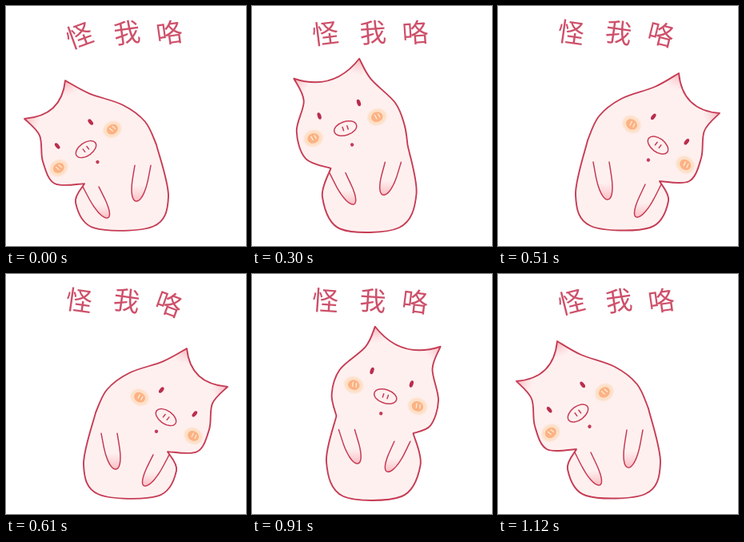
An HTML page for the animation above (1220 ms loop, 300x300 px).

```html
<!DOCTYPE html>
<html lang="zh">
<head>
<meta charset="utf-8">
<style>
  html, body { margin: 0; width: 100%; height: 100%; overflow: hidden; background: #fff; }
  svg { display: block; width: 100vw; height: 100vh; }
  text { font: 400 33px "Noto Sans CJK SC", "Noto Sans CJK", sans-serif; fill: #ce506a; text-anchor: middle; }
  .line { fill: none; stroke: #c63c54; stroke-width: 1.9; stroke-linecap: round; stroke-linejoin: round; }
  .thin { stroke-width: 1.5; }
</style>
</head>
<body>
<svg viewBox="0 0 300 300">
  <defs>
    <radialGradient id="blush">
      <stop offset="0" stop-color="#f6a5ae" stop-opacity=".8"/>
      <stop offset="1" stop-color="#fac4ca" stop-opacity="0"/>
    </radialGradient>
    <radialGradient id="halo">
      <stop offset=".75" stop-color="#fde0c8"/>
      <stop offset="1" stop-color="#fde6d8" stop-opacity="0"/>
    </radialGradient>
    <linearGradient id="paw" x1="0" y1="0" x2="0" y2="1">
      <stop offset=".55" stop-color="#fbc6ca" stop-opacity="0"/>
      <stop offset="1" stop-color="#fabcc2"/>
    </linearGradient>
    <clipPath id="inside"><path id="clip"/></clipPath>
    <ellipse id="eye" rx="2.3" ry="4.4" fill="#b92e4d"/>
    <g id="cheek">
      <ellipse rx="14" ry="12" fill="url(#halo)"/>
      <ellipse rx="7.4" ry="6.2" fill="#fcb283"/>
      <path d="M-2-3L-1 2M2.5-3L3.5 1.5" stroke="#fff0df" stroke-width="1.2" stroke-linecap="round"/>
    </g>
  </defs>
  <g id="words"></g>
  <g id="pig">
    <path id="skin" fill="#fff0f0"/>
    <g id="ears" clip-path="url(#inside)">
      <circle r="21" fill="url(#blush)"/><circle r="21" fill="url(#blush)"/>
    </g>
    <path id="outline" class="line"/>
    <g id="arms" fill="url(#paw)">
      <path class="line thin" style="fill:url(#paw)"/><path class="line thin" style="fill:url(#paw)"/>
    </g>
    <g id="face">
      <use href="#cheek" x="-42" y="-1"/><use href="#cheek" x="42" y="-1"/>
      <use href="#eye" x="-26" y="-25"/><use href="#eye" x="26" y="-25"/>
      <ellipse class="line thin" rx="14.5" ry="8.5"/>
      <path class="line thin" d="M-3-2.5V2M3-2.5V2"/>
      <circle cx="1.5" cy="22" r="2.2" fill="#c43b58"/>
    </g>
  </g>
</svg>
<script>
// Half a loop of [duration, level]; the other half mirrors it. Level 1 is a full lean, 2 adds the squash.
const STEPS = [[200, -2], [100, -1], [70, -.5], [70, 0], [70, .5], [100, 1]];
const HALF = STEPS.reduce((sum, [ms]) => sum + ms, 0);

// Key points of [left, right] side, each as [upright, leaning left]
const SIDES = [ // ear tip, temple, cheek, jaw, neck, hip, foot
  [[[96, 68], [98, 97], [77, 133], [80, 168], [101, 189], [90, 236], [112, 279]],
   [[23, 134], [42, 156], [46, 190], [61, 219], [98, 219], [87, 244], [110, 277]]],
  [[[188, 68], [189, 97], [208, 135], [207, 166], [199, 184], [208, 236], [185, 278]],
   [[74, 84], [104, 101], [146, 116], [174, 138], [188, 168], [203, 236], [184, 275]]]];
const ARMS = [ // shoulder, hand
  [[[111, 199], [128, 239]], [[106, 223], [126, 264]]],
  [[[182, 200], [167, 238]], [[171, 195], [163, 242]]]];
const NOSE = [[[139, 146]], [[100, 174]]];
const NECK = 4;

const WORDS = [["怪", 91.5], ["我", 151], ["咯", 204]];

const $ = id => document.getElementById(id);
const set = (el, name, value) => el.setAttribute(name, value);
const place = (el, [x, y], angle = 0) => set(el, "transform", `translate(${x} ${y}) rotate(${angle})`);

// Parabola through left lean, upright and right lean (the other side mirrored)
function bend([mid, lean], [, otherLean], t) {
  return mid.map((p, i) => {
    const left = lean[i], right = [300 - otherLean[i][0], otherLean[i][1]];
    return p.map((c, k) => c + (right[k] - left[k]) / 2 * t + ((left[k] + right[k]) / 2 - c) * t * t);
  });
}
const both = ([l, r], t) => [bend(l, r, t), bend(r, l, t)];

// Smooth curve through the points, without the initial move
function curve(points) {
  let d = "";
  for (let i = 0; i < points.length - 1; i++) {
    const p = points[i], q = points[i + 1], before = points[i - 1] || p, after = points[i + 2] || q;
    const a = p.map((c, k) => c + (q[k] - before[k]) / 6);
    const b = q.map((c, k) => c - (after[k] - p[k]) / 6);
    d += "C" + [...a, ...b, ...q].map(n => n.toFixed(2)).join(" ");
  }
  return d;
}

// Crown between the ear tips, sagging at right angles to their chord
function crown([x1, y1], [x2, y2]) {
  const sag = 30 / Math.hypot(x2 - x1, y2 - y1);
  return `Q${(x1 + x2) / 2 - (y2 - y1) * sag} ${(y1 + y2) / 2 + (x2 - x1) * sag} ${x2} ${y2}`;
}

function bodyPath(left, right) {
  const head = side => side.slice(0, NECK + 1), torso = side => side.slice(NECK);
  return "M" + left[0] + crown(left[0], right[0]) + curve(head(right))
    + curve([...torso(right).reverse(), ...torso(left).reverse()].length ? [...torso(right), ...torso(left).reverse()] : [])
    + curve(head(left).reverse()) + "Z";
}

// Open U from shoulder to hand
function armPath([shoulder, hand]) {
  const points = Array.from({ length: 13 }, (_, i) => {
    const a = Math.PI * i / 12, reach = Math.abs(Math.sin(a)) ** .6;
    return shoulder.map((c, k) => c + (hand[k] - c) * reach - (k ? 0 : 10 * Math.cos(a)));
  });
  return "M" + points[0] + curve(points);
}

$("words").innerHTML = WORDS.map(([c]) => `<g><text y="13">${c}</text></g>`).join("");

function draw(level) {
  const t = Math.max(-1, Math.min(1, level)), squash = Math.abs(level) - Math.abs(t);

  const sides = both(SIDES, t), d = bodyPath(...sides);
  for (const id of ["skin", "clip", "outline"]) set($(id), "d", d);
  sides.forEach((side, i) => place($("ears").children[i], side[0]));
  both(ARMS, t).forEach((arm, i) => set($("arms").children[i], "d", armPath(arm)));
  place($("face"), bend(NOSE, NOSE, t)[0], 37 * t);
  set($("pig"), "transform", `translate(0 287) scale(1 ${1 - .045 * squash}) translate(0 -287)`);

  // The word on the leaning side tips and drops the most
  WORDS.forEach(([, x], i) => {
    const outer = Math.max(0, level * (i - 1));
    place($("words").children[i], [x, 32.5 + 2 * outer], 8 * t + 6 * outer * Math.sign(t));
  });
}

function levelAt(ms) {
  let left = ms % HALF;
  const [, level] = STEPS.find(([duration]) => (left -= duration) < 0);
  return ms < HALF ? level : -level;
}

const start = performance.now();
function tick() {
  draw(levelAt((performance.now() - start) % (2 * HALF)));
  requestAnimationFrame(tick);
}
tick();
</script>
</body>
</html>
```
